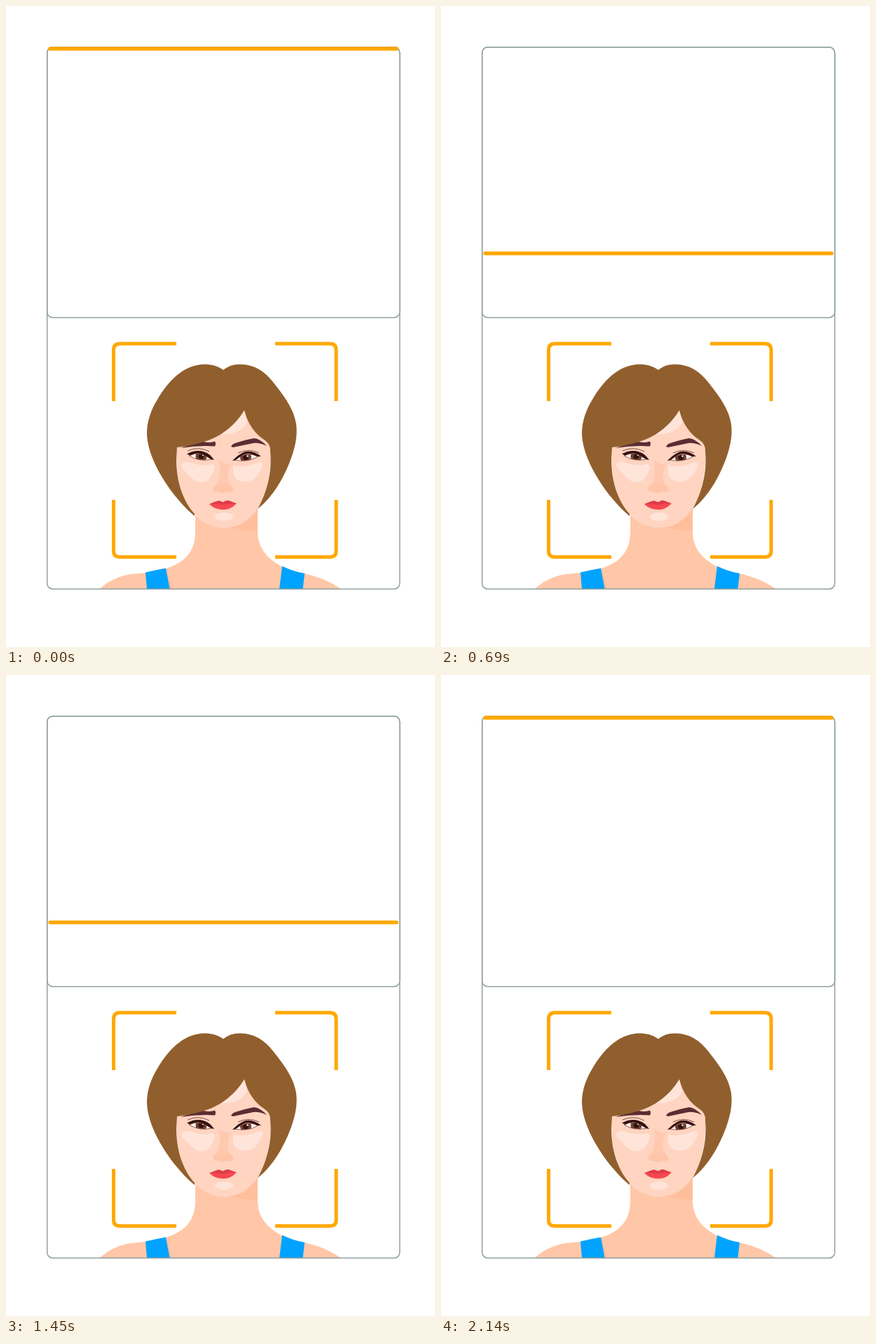
An HTML page with a canvas that plays this animation: 612 by 915 pixels, repeating every 2640 ms.

```html
<!DOCTYPE html>
<html lang="en">
<head>
<meta charset="utf-8">
<title>Face scan</title>
<style>
html, body { margin: 0; width: 100%; height: 100%; overflow: hidden; background: #fff; }
canvas { display: block; }
</style>
</head>
<body>
<canvas id="stage" width="612" height="915"></canvas>
<script>
const ctx = document.getElementById('stage').getContext('2d');
const ORANGE = '#ffa800', GREY = '#93a1a1', SKIN = '#ffc7a7', FACE = '#ffd4c0';
const LIGHT = '#ffe4d9', SHADE = '#ffc5a8', HAIR = '#915f2d', BROW = '#5b2d33';
const BLUE = '#00a3ff', LASH = '#35100f';
const LOOP = 2640, STEP = 30, MOVES = 30, TOP = 61, BOTTOM = 442, RETURN = 1240;

function fill(color, d) {
  ctx.fillStyle = color;
  ctx.fill(new Path2D(d));
}

function stroke(color, width, d) {
  ctx.strokeStyle = color;
  ctx.lineWidth = width;
  ctx.stroke(new Path2D(d));
}

function dot(color, x, y, rx, ry = rx) {
  ctx.fillStyle = color;
  ctx.beginPath();
  ctx.ellipse(x, y, rx, ry, 0, 0, Math.PI * 2);
  ctx.fill();
}

function box(x, y, w, h, r) {
  ctx.beginPath();
  ctx.roundRect(x, y, w, h, r);
}

function drawEye(white, x, y, lid) {
  ctx.save();
  ctx.clip(new Path2D(white));
  ctx.fillStyle = '#fff4ef';
  ctx.fillRect(x - 25, y - 15, 50, 30);
  dot('#70402f', x, y, 8);
  dot('#32130f', x, y, 3.8);
  dot('#fff', x + 2.5, y - 2, 1.2);
  ctx.restore();
  stroke('#713b31', 0.8, white);
  fill(LASH, lid);
}

function drawBody() {
  fill(SKIN, 'M270 700V751C270 782 251 796 228 803C209 810 190 809 172 812C156 816 143 823 134 832H477C465 823 453 818 440 814C423 808 406 808 393 800C372 788 359 774 359 749V690Z');
  fill('#ffbf9d', 'M316 744Q341 738 359 714V749.5Q336 748 316 744Z');
  fill('#ffb79b', 'M229 803L236 832H233L228 803Z');
  fill(BLUE, 'M199 808.5Q214 805 228 802.5L233.5 832H201Z');
  fill(BLUE, 'M394 799.5Q409 807 426 810L423.5 832H390Z');
}

function drawFace() {
  fill(FACE, 'M243 612V642C244 680 253 711 272 729C285 741 299 745 313 745C332 744 347 735 359 717C372 699 378 667 378 625L340 570Z');
  fill(LIGHT, 'M340 577L344 594Q335 613 305 611Z');
  fill(LIGHT, 'M250 655Q252 649 264 652Q281 658 294 654Q300 655 297 663C293 672 288 680 279 680C267 680 261 668 252 661Z');
  fill(LIGHT, 'M324 656C336 659 349 656 362 651Q368 651 366 657C361 668 355 679 341 679C331 679 325 674 324 667Z');
  fill('#ffc9b0', 'M303 647C306 657 306 669 302 680L296 688Q309 681 322 688C314 675 315 662 323 652Q313 657 303 647Z');
  fill(SHADE, 'M295 689Q297 683 304 683Q310 680 316 683Q323 684 325 690Q322 696 316 693Q310 698 304 693Q298 696 295 689Z');
  dot(LIGHT, 311, 729, 13, 6);

  fill('#df3b48', 'M290 711Q299 707 304 706Q309 708 310 708Q315 705 318 706Q323 708 329 710L310 714Z');
  fill('#f64850', 'M290 711Q300 711 310 712Q319 710 329 710Q321 719 310 719Q298 719 290 711Z');

  drawEye('M261 642Q276 634 294 647Q276 651 261 642Z', 278.5, 643,
    'M258 639.5Q276 630 291 641Q294 644 297 648Q293 648 289 645Q276 634 263 641.5Z');
  drawEye('M326 648Q343 635 360 643Q345 652 326 648Z', 342, 644.5,
    'M323 649Q332 640 339 637Q351 633 364 643L358 643Q344 635 333 644Q328 649 323 649Z');
  stroke('#804b40', 1, 'M259 635Q275 628 290 636M331 638Q346 631 361 638');

  fill(BROW, 'M249 631Q268 624 282 622Q292 624 298 621.5Q300 625 298 628.5Q274 627 249 631Z');
  fill(BROW, 'M321 629Q323 625 327 624Q342 619 354 617Q363 618 372 628Q361 623 353 624Q338 627 324 630Z');
}

function drawHair() {
  fill(HAIR, 'M310 519.5C301 513 291 511 280 511.5C252 514 232 535 217 560C207 576 201 592 201 611C202 638 218 668 237 694C248 708 259 720 269 728V725C252 706 243 678 243 646L244 630Q264 628 282 622C305 616 327 599 340 577C345 598 357 612 368 619Q378 625 377 636C380 667 371 697 359 718C380 702 397 673 407 645C413 628 416 613 414 597C411 575 396 556 382 538C369 521 354 512 335 511.5C325 511 317 514 310 519.5Z');
}

function drawFrames() {
  stroke(ORANGE, 5, 'M153.5 564V491Q153.5 482 162.5 482H243M384 482H462Q471 482 471 491V564M471 705V778Q471 786.5 462 786.5H384M243 786.5H162.5Q153.5 786.5 153.5 778V705');
  ctx.strokeStyle = GREY;
  ctx.lineWidth = 1.5;
  box(58.7, 58.7, 503, 773.5, 8);
  ctx.stroke();
  box(58.7, 58.7, 503, 386, 8);
  ctx.stroke();
}

function barY(t) {
  const moved = start => Math.min(MOVES, Math.max(0, Math.floor((t - start) / STEP)));
  return TOP + (BOTTOM - TOP) * (moved(0) - moved(RETURN)) / MOVES;
}

function draw(now) {
  ctx.fillStyle = '#fff';
  ctx.fillRect(0, 0, 612, 915);
  drawBody();
  drawFace();
  drawHair();
  drawFrames();
  ctx.fillStyle = ORANGE;
  box(60.3, barY((now - start) % LOOP) - 2.7, 499.7, 5.4, 2.7);
  ctx.fill();
}

const start = performance.now();
function tick() {
  draw(performance.now());
  requestAnimationFrame(tick);
}
tick();
</script>
</body>
</html>
```
